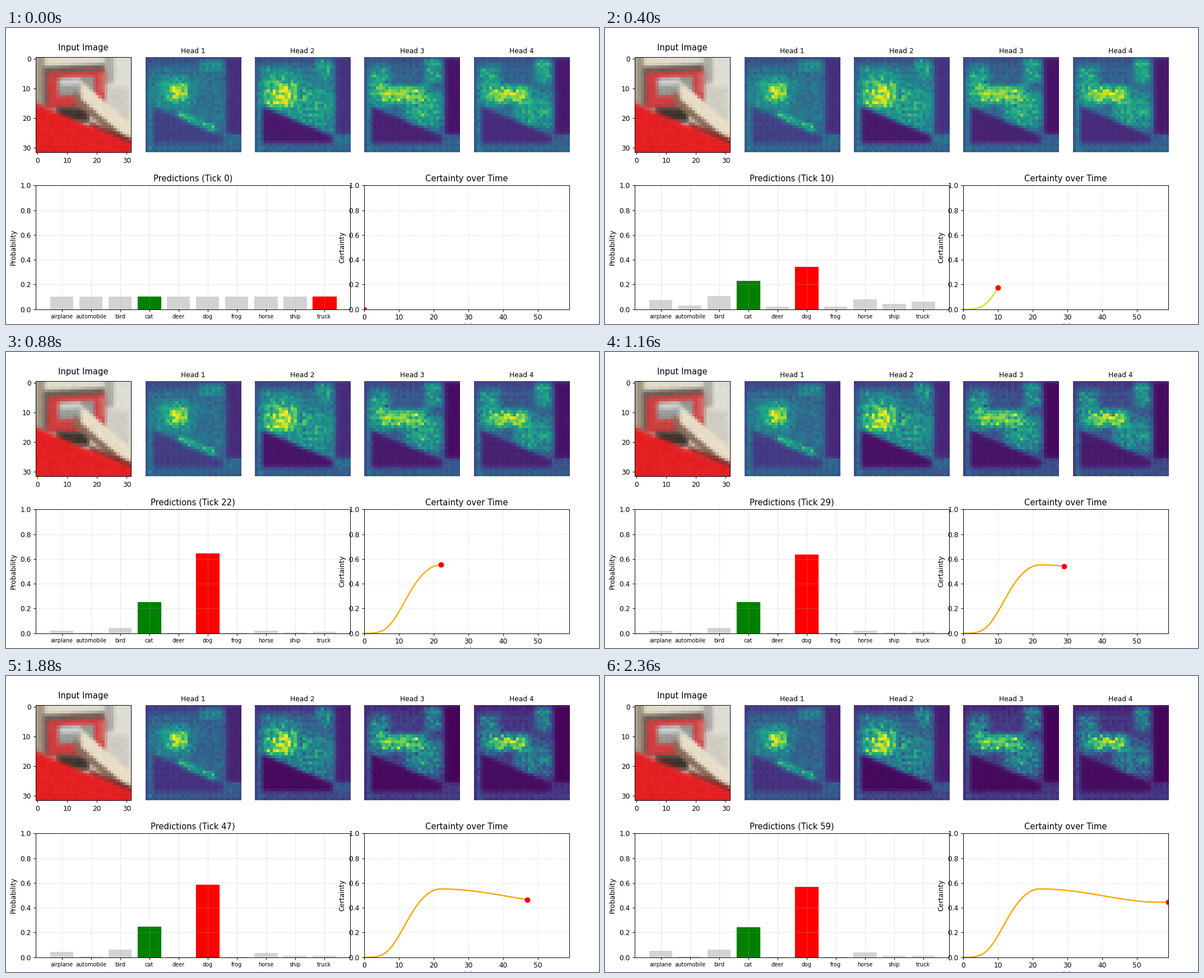
These frames come from a looping animation (1058x529 px, 2.4 s). A matplotlib script:

```python
import numpy as np
import matplotlib.pyplot as plt
from matplotlib.animation import FuncAnimation

W, H = 1058, 529
N, TICKS = 32, 60
rng = np.random.default_rng(7)
Y, X = np.indices((N, N)) + 0.5


# ---------- soft masks on the 32 x 32 grid ----------
def above(v, soft=0.35):
    return 1 / (1 + np.exp(-v / soft))


def between(v, lo, hi):
    return above(v - lo) * above(hi - v)


def box(x0, x1, y0, y1, y=Y):
    return between(X, x0, x1) * between(y, y0, y1)


def blob(cx, cy, rx, ry):
    return np.exp(-((X - cx) / rx) ** 4 - ((Y - cy) / ry) ** 4)


def lay(img, value, mask):
    return img + mask * (value - img)


DEPTH = Y - 15.6 - 0.42 * X        # below the sloping hood where positive
ARM = Y - 12 - 0.85 * (X - 16)     # distance from the middle of the arm
TILT = Y + 0.05 * (X - 12)


def make_photo():
    layers = [
        ((222, 222, 216), X / N),
        ((160, 146, 128), box(0, 3, -1, 17)),
        ((172, 170, 164), box(23, 26, -1, 9)),
        ((208, 205, 196), box(24, 31, 10, 28)),
        ((102, 94, 86), box(2.5, 23, 3, 17, TILT)),
        ((212, 60, 62), box(4, 23, 5, 17, TILT)),
        ((214, 122, 116), box(21.5, 23, 6, 13, TILT)),
        ((150, 158, 154), box(7.5, 19.5, 7, 13, TILT)),
        ((212, 215, 213), box(8, 15, 7.5, 9.5, TILT)),
        ((62, 52, 46), box(7, 18, 17, 22)),
        ((136, 108, 90), between(ARM, 2, 6) * above(X - 13)),
        ((232, 222, 200), between(ARM, -3, 3) * above(X - 15)),
        ((130, 48, 42), between(DEPTH, -1.6, 1) * above(X - 18)),
        ((228, 32, 35), above(DEPTH)),
    ]
    img = np.full((N, N, 3), (228, 220, 198), float)
    for colour, mask in layers:
        img = lay(img, np.array(colour), mask[..., None])
    img += rng.normal(0, 2, (N, N, 1))
    return np.clip(img, 0, 255).astype(np.uint8)


def make_head(base, hood, edge, ridge, spots):
    m = lay(np.full((N, N), base), 0.27, above(3 - Y))
    for value, *shape in spots:
        m = lay(m, value, blob(*shape))
    m = lay(m, hood, above(DEPTH) * between(X, 2, 26))
    m = lay(m, 0.65, ridge * np.exp(-(DEPTH + 1) ** 2 / 2) * between(X, 11, 23))
    m = lay(m, edge, above(X - 27) * above(26 - Y))
    m = lay(m, 0.33, above(Y - 29))
    m = lay(m, 0.5, between(X, 1, 2) * above(Y - 8))
    m = lay(m, 0.22, 1 - between(X, 0.7, 33) * above(Y - 0.7))
    weave = (X // 1 % 2) * (Y // 1 % 2) * ((Y < 7) | (Y > 20))
    m *= 1 - 0.14 * weave
    m *= 1 + rng.normal(0, 0.13, m.shape) * np.clip(m * 1.8, 0.2, 1)
    return np.clip(m, 0, 1)


# each field comes with how strongly it fades
WIDE = [(0.6, 5, 10, 4, 7), (0.6, 23, 4, 3, 5), (0.57, 20, 18, 7, 6)]
HEADS = [
    (make_head(0.38, 0.2, 0.14, 1,
               [(0.52, 22, 3, 4, 2), (0.62, 10, 12, 6, 5), (0.88, 11, 12, 3, 2.6)]), 0.18),
    (make_head(0.4, 0.07, 0.15, 0,
               [(0.58, 23, 3, 3, 4), (0.56, 19, 17, 8, 7),
                (0.6, 8, 11, 7, 7), (0.86, 9, 13, 5, 4)]), 0.35),
    (make_head(0.32, 0.1, 0.05, 0, WIDE + [(0.83, 13, 12.7, 8, 3)]), 0.55),
    (make_head(0.32, 0.13, 0.07, 0, WIDE + [(0.82, 12, 12.7, 7, 3)]), 0.65),
]

# ---------- probabilities ----------
T = np.arange(TICKS)


def ease(start, end):
    u = np.clip((T - start) / (end - start), 0, 1)
    return u * u * (3 - 2 * u)


# share of each class when most certain, and at the end
CLASSES = {
    "airplane": (.019, .052), "automobile": (.0025, .006), "bird": (.043, .063),
    "cat": (.252, .243), "deer": (.0008, .001), "dog": (.645, .567),
    "frog": (.0008, .002), "horse": (.021, .04), "ship": (.006, .012),
    "truck": (.012, .012),
}
NAMES = list(CLASSES)
TRUTH = NAMES.index("cat")
peak, late = np.log(np.array(list(CLASSES.values()))).T[..., None]
P = np.exp(ease(0, 22) * (peak + (late - peak) * ease(22, 56)))
P /= P.sum(0)
CERTAINTY = 1 + (P * np.log(P)).sum(0) / np.log(len(P))
FADE = ease(8, 55)

# ---------- figure ----------
fig = plt.figure(figsize=(12, 6), dpi=W / 12, facecolor="white")
LEFT, CELL, STEP = 53.2, 170.15, 195.35
IMG_TOP, TOP, TALL = 52.2, 281.3, 221.3


def place(col, y, span, h):
    w = CELL + (span - 1) * STEP
    return fig.add_axes([(LEFT + col * STEP) / W, 1 - (y + h) / H, w / W, h / H])


ax = place(0, IMG_TOP, 1, CELL)
ax.imshow(make_photo())
ax.set_title("Input Image", pad=10)

head_images = []
for i, (field, _) in enumerate(HEADS, 1):
    ax = place(i, IMG_TOP, 1, CELL)
    head_images.append(ax.imshow(field, cmap="viridis", vmin=0, vmax=1))
    ax.set_title(f"Head {i}", fontsize=10)
    ax.axis("off")

ax_bar = place(0, TOP, 3, TALL)
bars = ax_bar.bar(NAMES, P[:, 0])
ax_bar.set(ylim=(0, 1), ylabel="Probability")
ax_bar.tick_params(axis="x", labelsize=8)
ax_bar.grid(alpha=0.3)
bar_title = ax_bar.set_title("Predictions (Tick 0)")

ax_line = place(3, TOP, 2, TALL)
ax_line.set(xlim=(0, TICKS - 1), ylim=(0, 1), ylabel="Certainty",
            title="Certainty over Time")
ax_line.set_xlabel("Tick", labelpad=3)
ax_line.grid(ls="--", alpha=0.3)
curve, = ax_line.plot([], [], lw=2)
dot, = ax_line.plot([], [], "ro", ms=7)

YELLOW, ORANGE = np.array([0.87, 0.85, 0.12]), np.array([1, 0.647, 0])


def update(t):
    for image, (field, power) in zip(head_images, HEADS):
        image.set_data(field ** (1 + power * FADE[t]))
    best = len(P) - 1 - P[::-1, t].argmax()  # the last one wins a tie
    for i, bar in enumerate(bars):
        colour = "green" if i == TRUTH else "red" if i == best else None
        bar.set(height=P[i, t], facecolor=colour or "lightgray",
                edgecolor=colour or "none")
    bar_title.set_text(f"Predictions (Tick {t})")
    mix = np.clip((t - 15) / 9, 0, 1)
    curve.set_data(T[:t + 1], CERTAINTY[:t + 1])
    curve.set_color(tuple(YELLOW + mix * (ORANGE - YELLOW)))
    dot.set_data([t], [CERTAINTY[t]])
    return [*head_images, *bars, bar_title, curve, dot]


anim = FuncAnimation(fig, update, frames=TICKS, interval=40, repeat=True)
plt.show()
```
